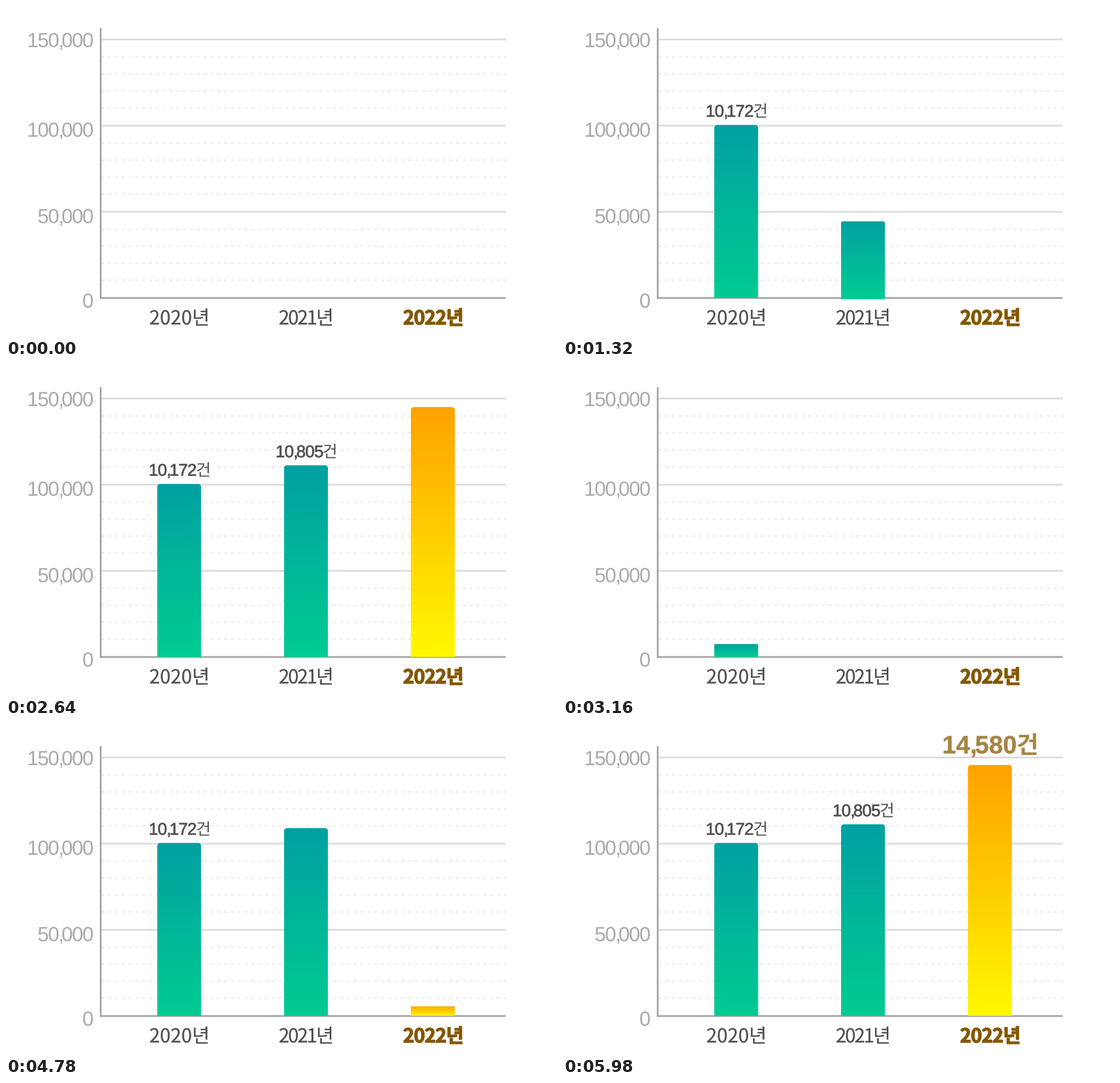
Write a matplotlib script that moves like this. It is 945 px wide and 567 px high and loops after 6000 ms.

```python
import numpy as np
import matplotlib.pyplot as plt
from matplotlib.animation import FuncAnimation
from matplotlib.colors import to_rgb
from matplotlib.patches import PathPatch
from matplotlib.path import Path
from matplotlib.textpath import TextPath

W, H = 945, 567
STEP, LOOP, CYCLE = 20, 6000, 3000
TOP, GAP = 57.4, 147.6
BASE = 500
COMMA_KERN = 0.08
SANS, CJK = "Liberation Sans", "Noto Sans CJK JP"
DARK, BROWN, AXIS, TICK = "#505050", "#835800", "#a5a5a5", "#aaaaaa"

fig = plt.figure(figsize=(W / 72, H / 72), dpi=72, facecolor="white")
ax = fig.add_axes([0, 0, 1, 1])


def ease(t, start, span):
    u = min(max((t - start) / span, 0), 1)
    return u * u * (3 - 2 * u)


def line(x, y, color, lw=3, **style):
    style.setdefault("solid_capstyle", "butt")
    ax.plot(x, y, color=color, lw=lw, snap=False, **style)


def text(x, y, s, size, color, family=SANS, weight="normal",
         tracking=0, stroke=0, right=False):
    """Draw s with its ink edge at x and its baseline at y."""
    prop = dict(family=family, weight=weight)

    def glyphs(part):
        return TextPath((0, 0), part, size=size, prop=prop)

    bar = glyphs("|").get_extents().x1
    parts = []
    for i, ch in enumerate(s):
        pen = glyphs(s[:i] + "|").get_extents().x1 - bar + i * tracking
        pen -= COMMA_KERN * size * s[:i].count(",")
        g = glyphs(ch)
        parts.append(Path(g.vertices + [pen, 0], g.codes))
    path = Path.make_compound_path(*parts)
    box = path.get_extents()
    shift = x - (box.x1 if right else box.x0)
    path = Path(path.vertices * [1, -1] + [shift, y], path.codes)
    return ax.add_patch(PathPatch(path, fc=color, ec=color if stroke else "none",
                                  lw=stroke, joinstyle="round", zorder=5))


def bar_path(x0, x1, top, bottom, ry, rx=5):
    k = 0.45
    pts = [(x0, bottom), (x0, top + ry),
           (x0, top + k * ry), (x0 + k * rx, top), (x0 + rx, top),
           (x1 - rx, top),
           (x1 - k * rx, top), (x1, top + k * ry), (x1, top + ry),
           (x1, bottom), (x0, bottom)]
    codes = [1, 2, 4, 4, 4, 2, 4, 4, 4, 2, 79]
    return Path(pts, codes)


class Bar:
    def __init__(self, x0, x1, top, colors, start, span, drop=0):
        self.x0, self.x1, self.top = x0, x1, top
        self.start, self.span, self.drop = start, span, drop
        a, b = (np.array(to_rgb(c)) for c in colors)
        mix = np.linspace(0, 1, 256)[:, None, None]
        self.img = ax.imshow(a + (b - a) * mix, aspect="auto",
                             interpolation="bilinear", zorder=4)

    def update(self, t):
        p = ease(t, self.start, self.span)
        self.img.set_visible(p > 0)
        if p == 0:
            return
        bottom = BASE + self.drop * (1 - p)
        low = BASE + self.drop
        top = low + (self.top - low) * p
        # the image overlaps its clip so that only the clip shapes the edge
        self.img.set_extent((self.x0 - 1, self.x1 + 1, bottom + 1, top - 1))
        path = bar_path(self.x0, self.x1, top, bottom, 5 * p)
        self.img.set_clip_path(path, ax.transData)


class Label:
    def __init__(self, color, start, span, *runs):
        self.rgb = np.array(to_rgb(color))
        self.start, self.span, self.runs = start, span, runs

    def update(self, t):
        a = ease(t, self.start, self.span)
        color = 1 - a * (1 - self.rgb)
        for run in self.runs:
            run.set_visible(a > 0)
            run.set_facecolor(color)
            if run.get_linewidth():
                run.set_edgecolor(color)


# Grid: three major lines, four dotted ones under each
for n in range(3):
    y = TOP + GAP * n
    line([163, 857], [y, y], "#dcdcdc", zorder=1)
    for k in range(4):
        yk = y + 30 + 29 * k
        line([164.5, 861], [yk, yk], "#ececec", 2.6, zorder=1,
             dashes=(1.1, 3.4), dash_capstyle="round")

floor = TOP + GAP * 3
line([162.4, 162.4], [38, floor + 1.5], AXIS, zorder=2)
line([161, 857], [floor, floor], AXIS, zorder=2)

for y, s in ((70.5, "150,000"), (224, "100,000"), (372, "50,000"), (516.8, "0")):
    text(149, y, s, 35, TICK, tracking=-1.6, right=True)

text(247, 545.5, "2020년", 33, DARK, CJK, stroke=0.3)
text(469, 545.5, "2021년", 33, DARK, CJK, tracking=-2.3, stroke=0.3)
text(682, 545.5, "2022년", 33, BROWN, CJK, "bold", tracking=-1, stroke=1.4)

TEAL, GOLD = ("#00a0a2", "#00cc91"), ("#ffa200", "#fff900")
parts = [
    Bar(259.4, 334.6, 203.8, TEAL, 0, 960),
    Bar(476.9, 552.1, 171.8, TEAL, 900, 960, drop=4),
    Bar(694.4, 769.8, 70.2, GOLD, 1660, 1020),
    Label(DARK, 905, 250,
          text(247, 189.7, "10,172", 29, DARK, tracking=-0.8, stroke=0.8),
          text(327.5, 189.7, "건", 28, DARK, CJK)),
    Label(DARK, 1950, 290,
          text(464.5, 158, "10,805", 29, DARK, tracking=-0.8, stroke=0.8),
          text(544.5, 158, "건", 28, DARK, CJK)),
    Label(BROWN, 2710, 410,
          text(653, 50.3, "14,580", 43, BROWN, weight="bold", stroke=0.5),
          text(780, 50, "건", 41, BROWN, CJK, "bold")),
]

ax.set_xlim(0, W)
ax.set_ylim(H, 0)
ax.axis("off")


def draw(i):
    t = i * STEP % CYCLE
    for part in parts:
        part.update(t)
    return []


anim = FuncAnimation(fig, draw, frames=LOOP // STEP, interval=STEP,
                     init_func=lambda: draw(0), repeat=True, repeat_delay=0)
plt.show()
```
